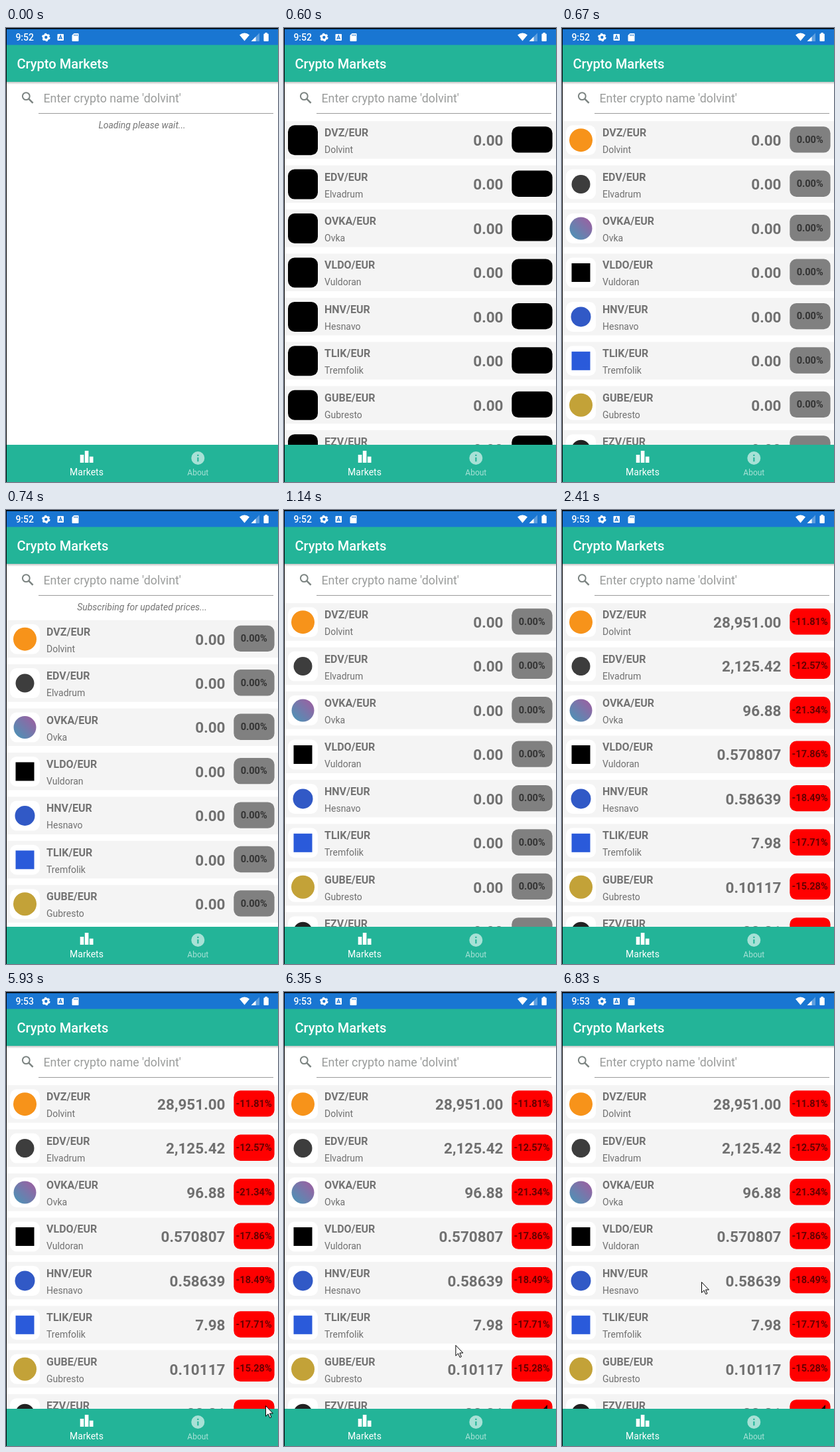
These frames come from a looping animation (410 px wide and 683 px high, 8 s). An HTML page:

```html
<!DOCTYPE html>
<html lang="en">
<head>
<meta charset="utf-8">
<title>Crypto Markets</title>
<style>
html, body { margin: 0; width: 100%; height: 100%; overflow: hidden; background: #fff; }
svg { display: block; width: 100%; height: 100%; font-family: Roboto, sans-serif; }
.code { font-weight: 700; font-size: 16px; fill: #737373; }
.name { font-size: 14px; fill: #707070; }
.price { font-weight: 700; font-size: 22.5px; fill: #707070; text-anchor: end; }
.pct { font-weight: 700; font-size: 14.6px; fill: #000; fill-opacity: .6; text-anchor: middle; }
.mid { text-anchor: middle; }
</style>
</head>
<body>
<svg viewBox="0 0 410 683" preserveAspectRatio="none">
  <defs>
    <clipPath id="listClip"><rect y="129" width="410" height="498"/></clipPath>
    <linearGradient id="shade" x2="0" y2="1">
      <stop stop-color="#000" stop-opacity=".24"/>
      <stop offset="1" stop-color="#000" stop-opacity="0"/>
    </linearGradient>
    <linearGradient id="dusk" x1="0" y1="1" x2="1" y2="0">
      <stop stop-color="#4597b8"/>
      <stop offset="1" stop-color="#a35b9f"/>
    </linearGradient>
  </defs>
  <rect width="410" height="683" fill="#fff"/>

  <g clip-path="url(#listClip)">
    <g id="list"></g>
    <path id="speck" d="M391 627L397 621V627Z" fill="#180000"/>
  </g>
  <text id="status" class="mid" x="205" y="150.5" font-size="14" font-style="italic" fill="#757575"></text>

  <!-- search field -->
  <g fill="none" stroke="#7b8381" stroke-width="2">
    <circle cx="30.3" cy="102.6" r="5.4"/>
    <path d="M34.3 106.6L40.6 112.8" stroke-width="2.5"/>
  </g>
  <text x="56.5" y="112" font-size="17.8" fill="#9a9c9b">Enter crypto name 'dolvint'</text>
  <rect x="49" y="128" width="354" height="1" fill="#9b9b9b"/>

  <!-- title bar -->
  <rect y="81" width="410" height="4" fill="url(#shade)"/>
  <rect y="25" width="410" height="56" fill="#23b498"/>
  <text x="16.4" y="61" font-size="20.1" font-weight="500" fill="#fff">Crypto Markets</text>

  <!-- system bar -->
  <rect width="410" height="25.5" fill="#1976d2"/>
  <g fill="#fff">
    <text id="clock" x="14.4" y="19.3" font-size="14" font-weight="500"></text>
    <g fill="none" stroke="#fff">
      <circle cx="60.3" cy="14" r="3.7" stroke-width="3"/>
      <circle cx="60.3" cy="14" r="5.3" stroke-width="2" stroke-dasharray="2.8 2.75"/>
    </g>
    <rect x="77.5" y="9" width="9.5" height="10" rx="1"/>
    <path d="M79.8 17L82.2 11L84.6 17M80.6 15.3H83.8" fill="none" stroke="#1976d2" stroke-width="1.2"/>
    <path d="M102.5 8H108.5Q109.5 8 109.5 9V19Q109.5 20 108.5 20H100.5Q99.5 20 99.5 19V11Z"/>
    <path d="M103 9.5V12M105.2 9.5V12M107.4 9.5V12" stroke="#1976d2"/>
    <path d="M352 10.5Q359.5 4.5 367 10.5L359.5 19.5Z"/>
    <path d="M382 7.5V20H369.5Z" fill-opacity=".3"/>
    <path d="M376.5 13V20H369.5Z"/>
    <path d="M390.5 7H393.7V8.5H394.8Q395.8 8.5 395.8 9.5V19Q395.8 20 394.8 20H389.4Q388.4 20 388.4 19V9.5Q388.4 8.5 389.4 8.5H390.5Z"/>
  </g>

  <!-- tab bar -->
  <rect y="627" width="410" height="56" fill="#23b498"/>
  <path d="M111.7 642H117.3V654H111.7ZM118.8 636H124.4V654H118.8ZM125.9 644.7H131.5V654H125.9Z" fill="#fff"/>
  <text class="mid" x="121.5" y="672.6" font-size="14" fill="#fff">Markets</text>
  <g fill="#fff" fill-opacity=".6">
    <path d="M279.3 647A10 10 0 1 1 299.3 647A10 10 0 1 1 279.3 647ZM288.3 641.8V644H290.4V641.8ZM288.3 646V652.3H290.4V646Z" fill-rule="evenodd"/>
    <text class="mid" x="289.3" y="673" font-size="12">About</text>
  </g>

  <rect width="410" height="1.6" fill="#000"/>
  <rect width="1" height="683" fill="#000"/>
  <path id="cursor" d="M.5 .5V16.3L4.1 12.8L6.7 18.6L9 17.6L6.5 12H11.4Z" fill="#fff" stroke="#000"/>
</svg>
<script>
const LOOP = 8000, PITCH = 66.42, SHIFT = 25.5;

// code, name, price, change, badge shape, colour, half size
const coins = [
  ['DVZ', 'Dolvint', '28,951.00', '-11.81%', 'circle', '#f7931a', 17.5],
  ['EDV', 'Elvadrum', '2,125.42', '-12.57%', 'circle', '#3d3d3d', 14],
  ['OVKA', 'Ovka', '96.88', '-21.34%', 'circle', 'url(#dusk)', 17],
  ['VLDO', 'Vuldoran', '0.570807', '-17.86%', 'square', '#000', 14],
  ['HNV', 'Hesnavo', '0.58639', '-18.49%', 'circle', '#3159c6', 15],
  ['TLIK', 'Tremfolik', '7.98', '-17.71%', 'square', '#2a5ada', 14],
  ['GUBE', 'Gubresto', '0.10117', '-15.28%', 'circle', '#c3a238', 17.5],
  ['EZV', '', '22.31', '-16.42%', 'circle', '#222', 14]
];
const $ = id => document.getElementById(id);

function mark(shape, color, r) {
  return shape === 'circle'
    ? `<circle class="mark" cx="28.5" cy="28.5" r="${r}" fill="${color}"/>`
    : `<rect class="mark" x="${28.5 - r}" y="${28.5 - r}" width="${2 * r}" height="${2 * r}" fill="${color}"/>`;
}

$('list').innerHTML = coins.map(([code, name, , , shape, color, r], i) => `
  <g transform="translate(0 ${140.2 + i * PITCH})">
    <rect width="410" height="56.5" fill="#f4f4f4"/>
    <rect class="tile" x="6" y="6" width="45" height="45" rx="10"/>
    ${mark(shape, color, r)}
    <text class="code" x="61" y="23">${code}/EUR</text>
    <text class="name" x="61" y="48">${name}</text>
    <text class="price" x="330.5" y="36.85"></text>
    <rect class="badge" x="343.3" y="8" width="61.3" height="39.4" rx="10"/>
    <text class="pct" x="373.7" y="32.5"></text>
  </g>`).join('');

const rows = [...$('list').children].map(g => {
  const part = c => g.querySelector('.' + c);
  return { tile: part('tile'), mark: part('mark'), price: part('price'), badge: part('badge'), pct: part('pct') };
});

function drawRow(row, i, t) {
  const blank = t < 670;
  const live = t >= (i < 4 ? 1410 : 1480);
  row.tile.setAttribute('fill', blank ? '#000' : '#fff');
  row.mark.setAttribute('visibility', blank ? 'hidden' : 'inherit');
  row.badge.setAttribute('fill', blank ? '#000' : live ? '#f00' : '#808080');
  row.price.textContent = live ? coins[i][2] : '0.00';
  row.pct.textContent = blank ? '' : live ? coins[i][3] : '0.00%';
}

// Pointer sweeps up and left, overshoots a little, then settles.
function pointer(t) {
  if (t >= 6830) return [210, 436];
  if (t >= 6760) return [210, 438];
  const p = Math.min(10, Math.floor((t - 5930) / 76)) / 10;
  const ease = x => x * x * (3 - 2 * x);
  const x = p < 0.8 ? 391 - 194 * ease(p / 0.8) : 197 + 13 * ease((p - 0.8) / 0.2);
  return [x, 622 - 182 * ease(p)];
}

function show(el, on) { el.setAttribute('visibility', on ? 'visible' : 'hidden'); }

function draw(t) {
  const subscribing = t >= 740 && t < 1140;
  $('clock').textContent = t < 2410 ? '9:52' : '9:53';
  $('status').textContent = t < 600 ? 'Loading please wait...'
    : subscribing ? 'Subscribing for updated prices...' : '';
  $('list').setAttribute('display', t < 600 ? 'none' : 'inline');
  $('list').setAttribute('transform', `translate(0 ${subscribing ? SHIFT : 0})`);
  rows.forEach((row, i) => drawRow(row, i, t));
  show($('cursor'), t >= 5930);
  show($('speck'), t >= 6006);
  $('cursor').setAttribute('transform', `translate(${pointer(Math.max(t, 5930))})`);
}

let start;
function tick(now) {
  start ??= now;
  draw((now - start) % LOOP);
  requestAnimationFrame(tick);
}
draw(0);
requestAnimationFrame(tick);
</script>
</body>
</html>
```
